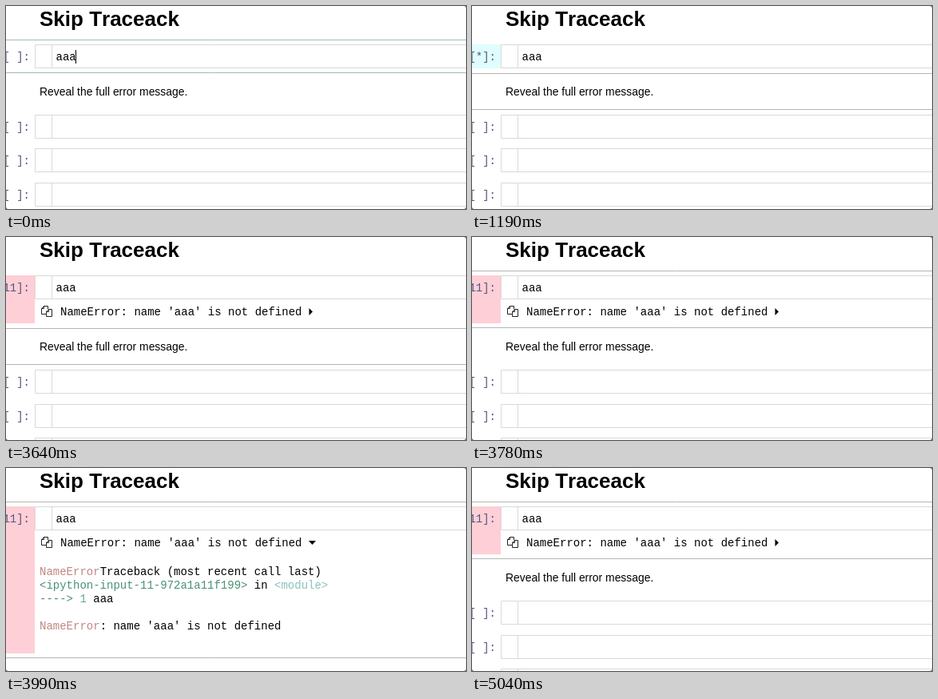
Write an HTML page that moves like this. It is 576 px wide and 254 px high and loops after 6.51 s.

```html
<!DOCTYPE html>
<html lang="en">
<head>
<meta charset="utf-8">
<title>Skip Traceack</title>
<style>
  html, body { margin: 0; width: 100%; height: 100%; overflow: hidden; background: #fff; }
  svg { display: block; }
  text { font: 14px "Liberation Mono", monospace; white-space: pre; }
  .title { font: bold 26px "Liberation Sans", Arial, sans-serif; font-kerning: none; }
  .note { font: 13.9px "Liberation Sans", Arial, sans-serif; }
  .prompt { fill: #55557f; text-anchor: end; }
  .box { fill: #fff; stroke: #d9d9d9; }
  .red { fill: #c08583; }
  .green { fill: #4a9173; }
  .pale { fill: #62a78a; }
  .cyan { fill: #8bc0c0; }
</style>
</head>
<body>
<svg width="576" height="254">
  <text class="title" x="42" y="25">Skip Traceack</text>
  <rect id="status" y="48" width="36"/>
  <path class="box" d="M580 48.5H36.5V77.5H580M57.5 48.5V77.5"/>
  <text id="label" class="prompt" x="30" y="68"></text>
  <text x="62.5" y="68">aaa</text>
  <path id="cursor" d="M87.5 55V72" stroke="#000"/>

  <g id="output">
    <path d="M47.5 86.5H52.5V90M44.5 89.5V96.5H50M47.5 86.5L44.5 89.5H47.5ZM53.5 90.5H57.5V99.5H50.5V93.5ZM53.5 90.5V93.5H50.5" fill="none" stroke="#222"/>
    <text x="68" y="98">NameError: name 'aaa' is not defined</text>
    <path id="caret"/>
    <svg id="panel" y="107" width="576">
      <g id="trace">
        <text x="42" y="26"><tspan class="red">NameError</tspan>Traceback (most recent call last)</text>
        <text x="42" y="43"><tspan class="green">&lt;ipython-input-11-972a1a11f199&gt;</tspan> in <tspan class="cyan">&lt;module&gt;</tspan></text>
        <text x="42" y="60"><tspan class="green">----&gt; </tspan><tspan class="pale">1</tspan> aaa</text>
        <text x="42" y="94"><tspan class="red">NameError</tspan>: name 'aaa' is not defined</text>
      </g>
    </svg>
  </g>

  <text id="note" class="note" x="42">Reveal the full error message.</text>
  <g id="cells"></g>
  <path id="frame"/>
  <path d="M574 0H576V2ZM0 252V254H2ZM576 252V254H574Z" fill="#777"/>
</svg>
<script>
const LOOP = 6510, ROW = 30.4;
const CELLS = [136, 178.4, 221];
const RUN = 1190, FAIL = 1400, SELECT = 3780, OPEN = 3850, CLOSE = 4900;
// [start time, height of the unfolded traceback]
const SLIDE = [[0, 0], [3850, 9], [3920, 70], [3990, 124], [4900, 118], [4970, 56], [5040, 0]];

const $ = id => document.getElementById(id);
const set = (id, attrs) => {
  for (const key in attrs) $(id).setAttribute(key, attrs[key]);
};

$("cells").innerHTML = CELLS.map((_, i) => `<g id="cell${i}">
  <path class="box" d="M580 .5H36.5V29.5H580M57.5 .5V29.5"/>
  <text class="prompt" x="30" y="20">[ ]:</text></g>`).join("");

function cursorAlpha(t) {
  if (t >= RUN) return 0;
  if (t < 420 || t >= 1050) return 1;
  return t < 490 ? 0.4 : 0;
}

function draw(t) {
  const failed = t >= FAIL, running = t >= RUN && !failed;
  const unfolded = t >= OPEN && t < CLOSE;
  const height = SLIDE.findLast(step => t >= step[0])[1];
  const shift = failed ? ROW + height : 0;
  const at = y => Math.round(y + shift);

  set("status", {
    height: at(78) - 48,
    fill: failed ? "#fecfd6" : running ? "#e0fdfd" : "#fff"
  });
  $("label").textContent = failed ? "[11]:" : running ? "[*]:" : "[ ]:";
  set("cursor", { opacity: cursorAlpha(t) });

  set("output", { visibility: failed ? "visible" : "hidden" });
  set("caret", { d: unfolded ? "M379 91H388L383.5 96Z" : "M379.5 89V98L384 93.5Z" });
  set("panel", { height });
  set("trace", { transform: `translate(0 ${(height - 70) * 0.02})` });

  set("note", { y: at(112) });
  CELLS.forEach((y, i) => set("cell" + i, { transform: `translate(0 ${at(y)})` }));

  // The selected cell is the note while running and after the error, else the code.
  const onNote = t >= RUN && t < SELECT;
  const [top, bottom] = onNote ? [at(84), at(129)] : [42, at(83)];
  set("frame", {
    d: `M0 ${top + 0.5}H576M0 ${bottom + 0.5}H576`,
    stroke: t < RUN ? "#a2bcac" : "#b4b4b4"
  });
}

function tick() {
  draw(performance.now() % LOOP);
  requestAnimationFrame(tick);
}
tick();
</script>
</body>
</html>
```
